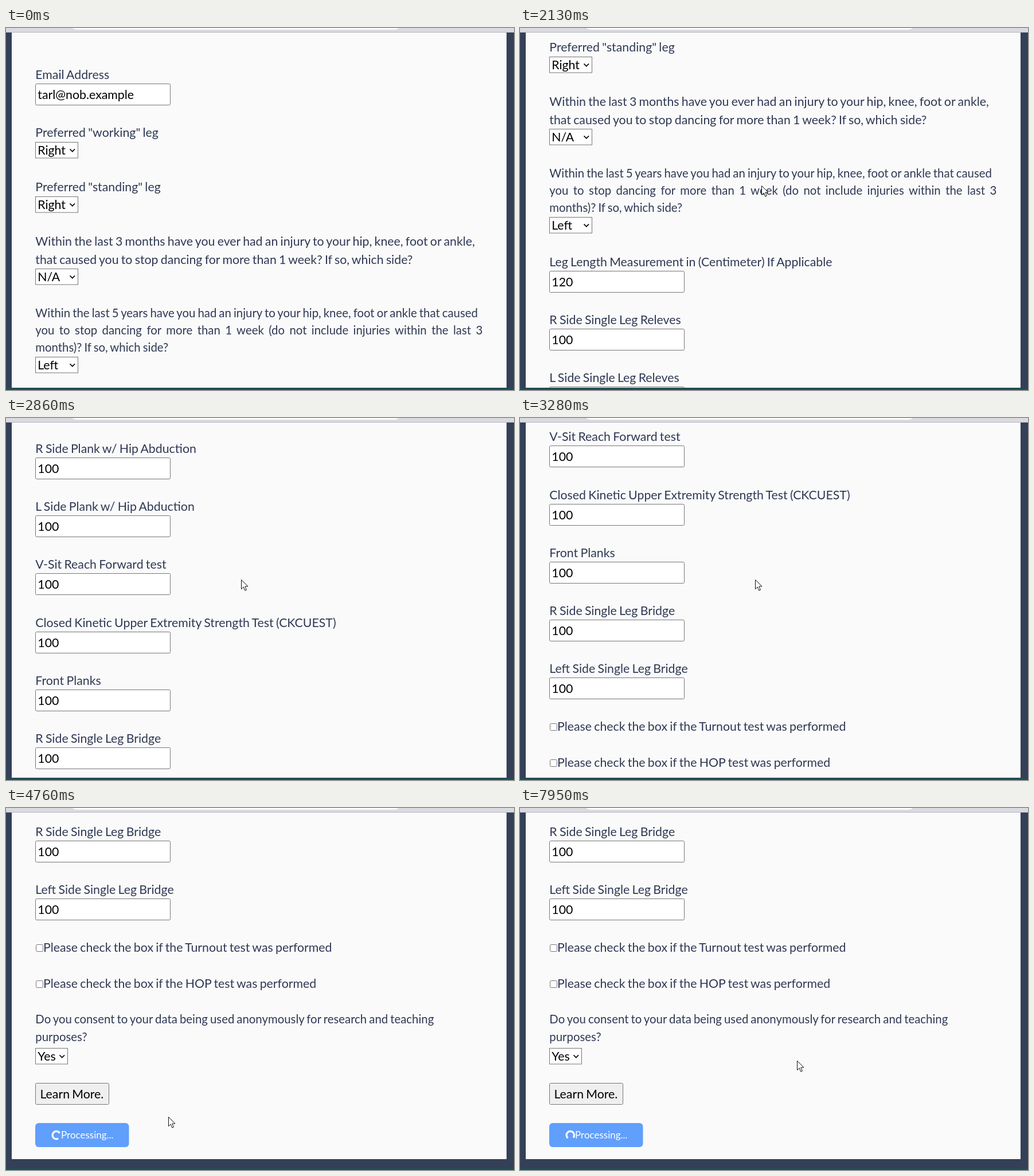
Animation of 886x632 px, one loop 8000 ms. Source, as an HTML page:

```html
<!DOCTYPE html>
<html lang="en">
<head>
<meta charset="utf-8">
<title>Assessment form</title>
<style>
  html, body { margin: 0; width: 100%; height: 100%; overflow: hidden; background: #344058; }
  svg { display: block; width: 100vw; height: 100vh; }
  text, p { font-family: Lato, sans-serif; white-space: pre; word-spacing: -.056em; }
  .label { font-size: 21.3px; fill: #2f3953; }
  .para { font-size: 20.37px; fill: #2f3953; }
  .value { font-size: 21.3px; fill: #000; }
  .btn { font-size: 17px; fill: #fff; }
  .box { fill: #fff; stroke: #767676; }
  .line { fill: none; stroke: #111; stroke-width: 1.7; }
  p { margin: 0; font-size: 20.37px; line-height: 30px; color: #2f3953; white-space: normal;
      text-align: justify; text-align-last: justify; }
</style>
</head>
<body>
<svg viewBox="0 0 886 632">
  <rect width="886" height="632" fill="#344058"/>
  <g id="page"></g>
  <rect width="886" height="8" fill="#dadae0"/>
  <rect y="7" width="886" height="1" fill="#b4b5bd"/>
  <path d="M115 0H685Q682 3 676 3H124Q119 3 115 0Z" fill="#fdfdfd"/>
  <rect y="628" width="886" height="4" fill="#234c56"/>
  <g id="cursor">
    <path id="arrow" d="M.5 .5V16.6L4.2 13L6.8 19.2L9.4 18.1L6.8 12H12Z" fill="#fff" stroke="#111" stroke-linejoin="round"/>
    <path id="beam" d="M-4 -9H-1Q0 -9 0 -8Q0 -9 1 -9H4M0 -8V8M-4 9H-1Q0 9 0 8Q0 9 1 9H4" fill="none" stroke="#111"/>
    <path id="hand" d="M-1.5 1.5Q0 -.5 1.5 1.5V9Q4 7.5 5 9.5Q7.5 8.5 8.5 10.5Q11 9.5 11.5 12V17Q11 20 9 22.5H0L-6 14Q-6 11 -3.5 12L-1.5 14Z" fill="#fff" stroke="#111" stroke-linejoin="round"/>
  </g>
</svg>
<script>
const LOOP = 8000, STEP = 67, LEFT = 51, INK = 51.3, END = 1825;
const $ = id => document.getElementById(id);

const text = (x, y, str, cls = 'label') => `<text x="${x}" y="${y}" class="${cls}">${str}</text>`;
const rect = (x, y, w, h, r, attrs) =>
  `<rect x="${x + .5}" y="${y + .5}" width="${w - 1}" height="${h - 1}" rx="${r}" ${attrs}/>`;

const field = (y, name, value) =>
  text(INK, y - 8, name) + rect(LEFT, y, 236, 38, 2, 'class="box"') + text(55.3, y + 27, value, 'value');

const select = (y, value, w = 75) =>
  rect(LEFT, y, w, 28.5, 0, 'class="box"') + text(55.2, y + 22.4, value, 'value') +
  `<path class="line" d="M${LEFT + w - 14.5} ${y + 12.4}l4.3 4.3l4.3 -4.3"/>`;

const check = (y, str) =>
  rect(LEFT + 1, y, 13, 13, 2, 'class="box"') + text(65, y + 13.3, str);

const fields = [
  'Leg Length Measurement in (Centimeter) If Applicable',
  'R Side Single Leg Releves', 'L Side Single Leg Releves',
  'R Side Passe Releve Balance (Eyes Opened)', 'L Side Passe Releve Balance (Eyes Opened)',
  'R Side Passe Flat Foot Balance (Eyes Closed)', 'L Side Passe Flat Foot Balance (Eyes Closed)',
  'R Side Plank w/ Hip Abduction', 'L Side Plank w/ Hip Abduction',
  'V-Sit Reach Forward test', 'Closed Kinetic Upper Extremity Strength Test (CKCUEST)',
  'Front Planks', 'R Side Single Leg Bridge', 'Left Side Single Leg Bridge'
];

$('page').innerHTML =
  `<rect x="10" y="-10" width="863" height="${END + 623}" fill="#fafafa"/>` +
  field(97, 'Email Address', 'tarl@nob.example') +
  text(INK, 190.3, 'Preferred "working" leg') + select(199, 'Right') +
  text(INK, 285.3, 'Preferred "standing" leg') + select(294, 'Right') +
  text(INK, 380, 'Within the last 3 months have you ever had an injury to your hip, knee, foot or ankle,') +
  text(INK, 411.6, 'that caused you to stop dancing for more than 1 week? If so, which side?') +
  select(420, 'N/A') +
  text(INK, 505, 'Within the last 5 years have you had an injury to your hip, knee, foot or ankle that caused', 'para') +
  `<foreignObject x="${INK}" y="512.3" width="780" height="32"><p xmlns="http://www.w3.org/1999/xhtml">` +
  'you to stop dancing for more than 1 week (do not include injuries within the last 3</p></foreignObject>' +
  text(INK, 565.4, 'months)? If so, which side?', 'para') +
  select(574, 'Left') +
  fields.map((name, i) => field(668 + Math.round(101.15 * i), name, i ? '100' : '120')).join('') +
  `<g transform="translate(0 ${END})">` +
  check(238, 'Please check the box if the Turnout test was performed') +
  check(301, 'Please check the box if the HOP test was performed') +
  text(INK, 376.3, 'Do you consent to your data being used anonymously for research and teaching', 'para') +
  text(INK, 406.6, 'purposes?', 'para') +
  select(419, 'Yes', 57) +
  rect(LEFT, 480, 129, 38, 2, 'fill="#efefef" stroke="#767676"') +
  text(59.4, 507.4, 'Learn More.', 'value') +
  `<rect id="submit" x="${LEFT}" y="550" width="163.5" height="42" rx="6"/>` +
  '<text id="idle" class="btn" x="132.8" y="577.4" text-anchor="middle">Submit</text>' +
  '<g id="busy">' + text(96, 577.4, 'Processing...', 'btn') +
  '<path id="spinner" d="M4.77 4.77A6.75 6.75 0 1 1 4.77 -4.77" fill="none" stroke="#fff" stroke-width="3.2"/></g></g>';

const scrollKeys = [
  [1923, 0], [1990, 40], [2124, 244], [2459, 651], [2660, 1100], [2794, 1306], [2861, 1307],
  [3073, 1307], [3140, 1335], [3274, 1530], [3475, 1800], [3542, END]
];
const cursorKeys = [
  [110, 796, 609], [330, 560, 330], [579, 281, 112], [783, 281, 112],
  [850, 225, 118], [917, 177, 118], [1118, 177, 118], [1319, 320, 205], [1520, 421, 275],
  [2124, 421, 275], [2325, 418, 282], [2459, 418, 282], [2794, 410, 282], [3408, 410, 282],
  [3810, 296, 553], [3877, 276, 570], [4279, 188, 577], [4480, 188, 577],
  [4882, 330, 520], [5290, 483, 441]
];

// Linear interpolation of one column in a list of timed keys
function sample(keys, t, col) {
  const i = keys.findIndex(k => k[0] > t);
  if (i < 0) return keys[keys.length - 1][col];
  if (i === 0) return keys[0][col];
  const a = keys[i - 1], b = keys[i];
  return a[col] + (b[col] - a[col]) * (t - a[0]) / (b[0] - a[0]);
}

function hold(t) {
  const base = [3140, 1990, 1180, 850, 110, 0].find(b => b <= t);
  return base + Math.floor((t - base) / STEP + .05) * STEP;
}

const show = (id, on) => $(id).setAttribute('display', on ? 'inline' : 'none');
const move = (id, x, y, rot = 0) => $(id).setAttribute('transform', `translate(${x} ${y}) rotate(${rot})`);

function draw(time) {
  const t = hold(time);
  const x = sample(cursorKeys, t, 1), y = sample(cursorKeys, t, 2);
  const busy = time >= 4550;
  const over = !busy && t > 3800 && x < 214 && y > 550;
  const typing = t >= 850 && t < 1200;

  move('page', 0, -Math.round(sample(scrollKeys, t, 1)));
  move('cursor', Math.round(x), Math.round(y));
  show('cursor', time >= 110);
  show('beam', typing);
  show('hand', over);
  show('arrow', !typing && !over);

  $('submit').setAttribute('fill', busy ? '#609ffc' : over ? '#0b5ed7' : '#0d6efd');
  show('idle', !busy);
  show('busy', busy);
  move('spinner', 87.8, 571.2, ((t - 6021) * .48 - 95) % 360);
}

const start = performance.now();
function frame() {
  draw((performance.now() - start) % LOOP);
  requestAnimationFrame(frame);
}
frame();
</script>
</body>
</html>
```
